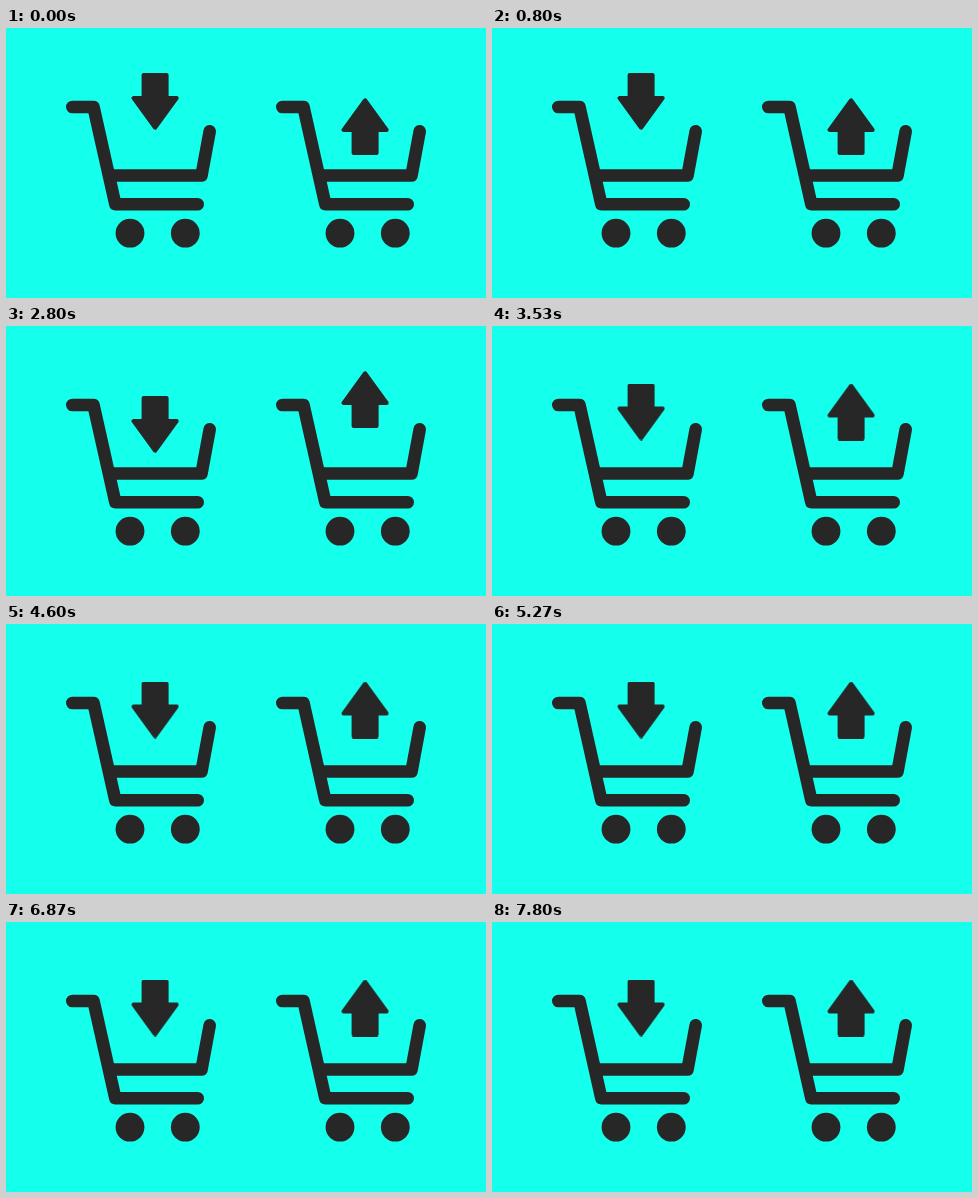
An HTML page that plays this animation: 480x270 px, repeating every 8.07 s.

```html
<!DOCTYPE html>
<html lang="en">
<head>
<meta charset="utf-8">
<title>Shopping carts</title>
<style>
  html, body { margin: 0; width: 100%; height: 100%; overflow: hidden; background: #14ffec; }
  svg { display: block; width: 480px; height: 270px; }
  .line { fill: none; stroke: #272727; stroke-width: 12.6; stroke-linecap: round; stroke-linejoin: round; }
  .arrow { fill: #272727; stroke: #272727; stroke-width: 4; stroke-linejoin: round; }
  circle { fill: #272727; }
</style>
</head>
<body>
<svg viewBox="0 0 480 270">
  <defs>
    <g id="cart">
      <path class="line" d="M66.3 79H87.5L109.3 176.2H191.7M104 147.5H195.5L203.7 103.3"/>
      <circle cx="124" cy="205.2" r="14.4"/>
      <circle cx="179.3" cy="205.2" r="14.4"/>
    </g>
    <path id="arrow" class="arrow" d="M137.6 47H160.6V70H170.7L149.1 99.7L127.5 70H137.6Z"/>
  </defs>
  <use href="#cart"/>
  <use href="#cart" x="210"/>
  <g id="down"><use href="#arrow"/></g>
  <g id="up"><use href="#arrow" transform="translate(210 172) scale(1 -1)"/></g>
</svg>
<script>
  const LOOP = 8070, LAST = 117;
  const BOB = [0, 12.5, 25, 12.5];

  // 15 steps per second on a 10 ms clock; the last pose holds until the loop restarts
  function bob(id, dir) {
    const pose = n => `translate(0px, ${dir * BOB[n % BOB.length]}px)`;
    const keys = [];
    for (let n = 0; n <= LAST; n++) {
      const time = Math.round(n * 20 / 3) * 10;
      keys.push({ offset: time / LOOP, transform: pose(n), easing: 'steps(1, end)' });
    }
    keys.push({ offset: 1, transform: pose(LAST) });
    document.getElementById(id).animate(keys, { duration: LOOP, iterations: Infinity });
  }

  bob('down', 1);
  bob('up', -1);
</script>
</body>
</html>
```
